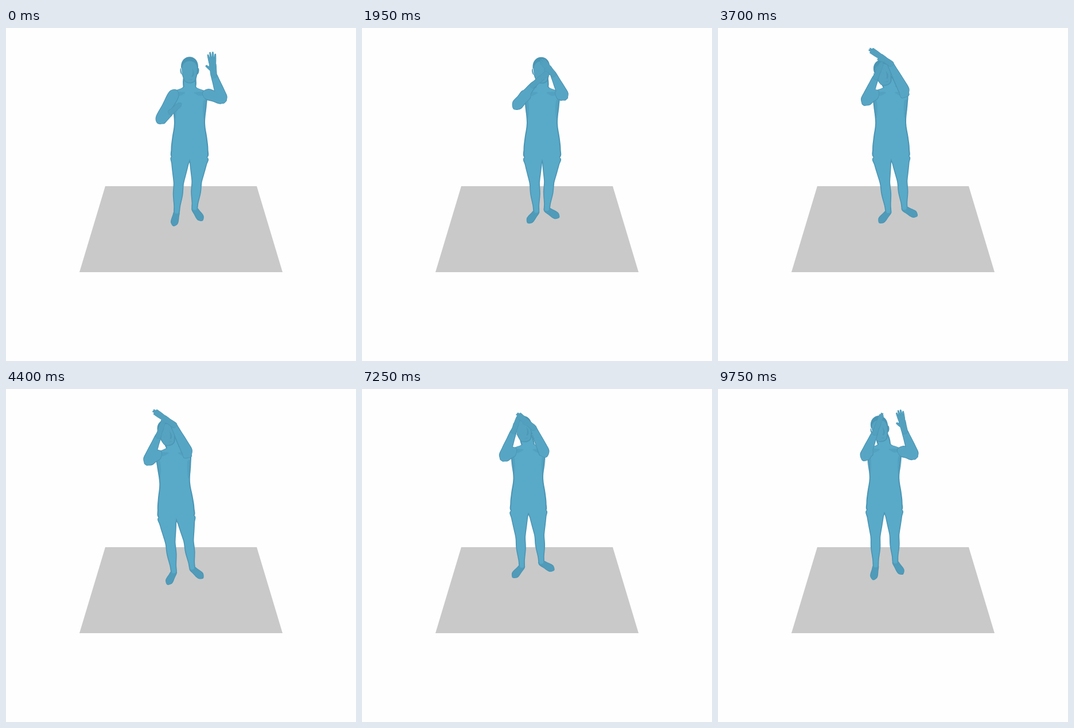
Write an HTML page that moves like this. It is 610 by 581 pixels and loops after 9800 ms.

```html
<!DOCTYPE html>
<html lang="en">
<head>
<meta charset="utf-8">
<title>Moving figure</title>
<style>
html, body { margin: 0; width: 100%; height: 100%; overflow: hidden; background: #fefefe; }
svg { display: block; width: 100%; height: 100%; }
</style>
</head>
<body>
<svg id="stage" viewBox="0 0 610 581" xmlns="http://www.w3.org/2000/svg">
  <path d="M173 276H437L482 426H128Z" fill="#c9c9c9"/>
</svg>
<script>
const LOOP = 9800, STEP = 50;
const DARK = '#4a95b3', LIGHT = '#59a9c8';

const mix = (a, b, s) => [a[0] + (b[0] - a[0]) * s, a[1] + (b[1] - a[1]) * s];
const num = x => x.toFixed(2);

// Smooth 0 to 1 between two times, and a smooth bump around one time
function ease(t, from, to) {
  const u = Math.min(1, Math.max(0, (t - from) / (to - from)));
  return u * u * (3 - 2 * u);
}
const pulse = (t, mid, width) => Math.exp(-(((t - mid) / width) ** 2));

// Point plus weighted offsets [weight, dx, dy]
const shift = (p, ...offsets) =>
  offsets.reduce(([x, y], [w, dx, dy]) => [x + w * dx, y + w * dy], p);

function pose(t) {
  const back = ease(t, 3000, 8000);        // stepping away from the viewer
  const nod = pulse(t, 3900, 1300);        // head tipped, arms overhead
  const reach = pulse(t, 1950, 1000);      // hands meet before the face
  const drop = pulse(t, 5950, 800);        // right arm lowered
  const lift = pulse(t, 5300, 700);        // left hand raised
  const wave = pulse(t, 500, 350);
  const late = ease(t, 7500, 9750);
  const start = Math.exp(-t / 1600);       // left arm rising from the chest
  const cross = ease(t, 0, 3400) - ease(t, 6500, 11000);

  const crotch = [320 - 30 * ease(t, 200, 6300), 229 - 14 * back];
  const neck = shift(crotch, [1, 0, 7 * back - 126], [pulse(t, 5300, 1100), -11, 0]);
  const bow = -13 * nod - 8 * ease(t, 5500, 7500);
  const head = shift(neck, [1, bow, -29.5 - bow * .4]);

  const stance = 17 - 8 * pulse(t, 2100, 1600);
  const turn = 10 + 35 * (pulse(t, 2900, 1700) + .8 * pulse(t, 7300, 1000));
  const mid = [313 - 21 * ease(t, 2500, 9000), 319 - 13 * back];
  const legs = [-1, 1].map(k => {
    const hip = shift(crotch, [1, k * 16, -3]);
    const ankle = shift(mid, [k * stance, 1, -.2]);
    const a = (turn + (k > 0 ? 20 : 0)) * Math.PI / 180;
    const toe = shift(ankle, [1, k * 22 * Math.sin(a), 20 * Math.cos(a)]);
    return { hip, ankle, toe, knee: mix(hip, ankle, .5) };
  });

  const left = {
    elbow: shift(neck, [1, -42, 22], [start, -9, 35], [lift, -5, 0], [late, 8, 0]),
    wrist: shift(neck, [1, -25, -24], [start, -8, 68], [reach, 12, 0], [lift, 0, -5], [late, 9, 3]),
    tip: shift(neck, [1, -16, -50], [start, 0, 79], [reach, 30, -2], [lift, 0, -16], [late, 12, -3]),
    open: .25 + .2 * reach, thumb: 0
  };
  const over = nod * cross;
  const right = {
    elbow: shift(neck, [1, 57, 21], [cross, -32, -8], [over, 0, -5], [drop, 17, 24]),
    wrist: shift(neck, [1, 42, -21], [cross, -37, -12], [over, -6, -9], [reach, 0, 6], [drop, 10, 35], [wave, 0, -7]),
    tip: shift(neck, [1, 38, -59], [cross, -63, 4], [over, -11, -11], [reach, 0, 10], [drop, 24, 35], [wave, 0, -9]),
    open: 1 - .5 * cross - .3 * drop, thumb: -1
  };
  left.shoulder = shift(neck, [1, -27, 12]);
  right.shoulder = [Math.min(neck[0] + 30, right.elbow[0] - 2), neck[1] + 12];
  return { neck, crotch, head, legs, left, right, tilt: bow * 1.1, scale: 1 - .03 * back };
}

// Closed smooth curve through points
function curve(pts) {
  const n = pts.length, g = i => pts[(i + n) % n];
  let d = 'M' + pts[0].map(num).join(' ');
  for (let i = 0; i < n; i++) {
    const [a, b, c, e] = [g(i - 1), g(i), g(i + 1), g(i + 2)];
    d += 'C' + [b[0] + (c[0] - a[0]) / 6, b[1] + (c[1] - a[1]) / 6,
      c[0] - (e[0] - b[0]) / 6, c[1] - (e[1] - b[1]) / 6, c[0], c[1]].map(num).join(' ');
  }
  return d + 'Z';
}

// Tapered limb along [x, y, halfWidth] joints
function limb(joints, trim = 0, cap = .9) {
  const left = [], right = [], ends = [], last = joints.length - 1;
  joints.forEach(([x, y, w], i) => {
    const a = joints[Math.max(0, i - 1)], b = joints[Math.min(last, i + 1)];
    const dx = b[0] - a[0], dy = b[1] - a[1], l = Math.hypot(dx, dy) || 1;
    const r = Math.max(.3, w - trim), ux = dx / l * r, uy = dy / l * r;
    left.push([x + uy, y - ux]);
    right.unshift([x - uy, y + ux]);
    if (i === 0) ends[0] = [x - ux * cap, y - uy * cap];
    if (i === last) ends[1] = [x + ux * cap, y + uy * cap];
  });
  return curve([ends[0], ...left, ends[1], ...right]);
}

const along = (a, b, list, k = 1) => list.map(([s, w]) => [...mix(a, b, s), w * k]);

const torso = (n, c, k, trim) => limb(along(n, c,
  [[-.04, 10], [.01, 13], [.06, 28], [.14, 31], [.27, 29.5], [.5, 27], [.7, 30.5], [.86, 32.5], [.98, 30]], k), trim, .1);

const leg = ({ hip, knee, ankle }, k, trim) => limb([
  ...along(hip, knee, [[0, 16.5], [.25, 15], [.55, 12.5], [.85, 9.8], [1, 9]], k),
  ...along(knee, ankle, [[.35, 8.8], [.75, 6], [1, 5]], k)], trim, .5);

const foot = ({ ankle, toe }, trim) =>
  limb(along(ankle, toe, [[-.1, 5], [.35, 6], [.75, 6.8], [1, 5.6]]), trim, .8);

const sleeve = ({ shoulder, elbow, wrist }, trim) =>
  limb(along(shoulder, elbow, [[0, 9.5], [.5, 9.5], [1, 9.2]]), trim) +
  limb(along(elbow, wrist, [[0, 9.2], [.3, 9], [.7, 7], [1, 5.2]]), trim);

function hand({ wrist: w, tip, open, thumb }, trim) {
  const dx = tip[0] - w[0], dy = tip[1] - w[1];
  const len = Math.hypot(dx, dy) || 1, dir = Math.atan2(dy, dx);
  const palm = mix(w, tip, .5), pw = 4.2 + 1.8 * open;
  let d = limb(along(w, palm, [[-.2, 5], [.4, pw], [1, pw]]), trim, .5);
  for (let k = -1.5; k <= 1.5; k++) {
    const off = k * (1 + 1.7 * open), a = dir + k * .1 * open;
    const x = palm[0] - dy / len * off, y = palm[1] + dx / len * off;
    const l = len * (.5 - .045 * k * k);
    d += limb([[x, y, 2.1], [x + Math.cos(a) * l, y + Math.sin(a) * l, 1.4]], trim * .5);
  }
  if (thumb) {
    const a = dir + thumb * .6 * open, l = len * .5;
    d += limb([[...mix(w, tip, .15), 3], [w[0] + Math.cos(a) * l, w[1] + Math.sin(a) * l, 1.8]], trim * .5);
  }
  return d;
}

// Soft shading at collar and ribs on side k
function shade(n, c, k) {
  const [p, s, q] = [.08, .2, .32].map(u => mix(n, c, u));
  return limb([[p[0] + k * 9, p[1], 1], [p[0] + k * 18, p[1] + 2, 3.5], [p[0] + k * 26, p[1] + 1, 2]]) +
    limb([[s[0] + k * 27, s[1], 3], [q[0] + k * 26, q[1], 3], [q[0] + k * 25, q[1] + 13, 1]]);
}

const stage = document.getElementById('stage');
function layer(fill, opacity = 1) {
  const p = document.createElementNS(stage.namespaceURI, 'path');
  p.setAttribute('fill', fill);
  p.setAttribute('opacity', opacity);
  return stage.appendChild(p);
}

const parts = {
  bodyEdge: layer(DARK), feet: layer('#509bb9'), body: layer(LIGHT), chest: layer(DARK, .4),
  skull: layer(DARK), face: layer('#55a3c1'), nose: layer(DARK, .8)
};
for (const side of ['left', 'right']) {
  parts[side + 'Edge'] = layer(DARK);
  parts[side + 'Arm'] = layer('#57a5c4');
  parts[side + 'HandEdge'] = layer(DARK);
  parts[side + 'Hand'] = layer('#53a0be');
}
const put = (name, d) => parts[name].setAttribute('d', d);

put('skull', 'M-15-6C-15-29 15-29 15-6C15 3 13 10 11 17C8 25-7 25-10 17C-13 10-15 3-15-6Z' +
  'M-14-4C-18-5-17 7-13 8ZM14-4C18-5 17 7 13 8Z');
put('face', 'M-13-3C-13-20 13-20 13-3C13 4 11 11 9 17C7 23-6 23-9 17C-11 11-13 4-13-3Z');
put('nose', 'M5-3C8 3 9 8 5 12L3 11C6 8 6 2 5-3ZM-1 16H6L3 17Z');

function draw(t) {
  const p = pose(t), { neck, crotch, head, legs, scale } = p;
  const feet = trim => legs.map(l => foot(l, trim)).join('');
  const body = trim => legs.map(l => leg(l, scale, trim * .8)).join('') +
    torso(neck, crotch, scale, trim) +
    limb([[...mix(head, neck, .3), 10], [...neck, 11]], trim, .2);
  put('bodyEdge', body(0) + feet(0));
  put('feet', feet(1.3));
  put('body', body(2));
  put('chest', shade(neck, crotch, -1) + shade(neck, crotch, 1));

  const place = `translate(${head.map(num).join(' ')}) rotate(${num(p.tilt)})`;
  for (const k of ['skull', 'face', 'nose']) parts[k].setAttribute('transform', place);

  for (const side of ['left', 'right']) {
    put(side + 'Edge', sleeve(p[side], 0));
    put(side + 'Arm', sleeve(p[side], 1.2));
    put(side + 'HandEdge', hand(p[side], 0));
    put(side + 'Hand', hand(p[side], .8));
  }
}

function tick() {
  draw(Math.floor(performance.now() % LOOP / STEP) * STEP);
  requestAnimationFrame(tick);
}
tick();
</script>
</body>
</html>
```
